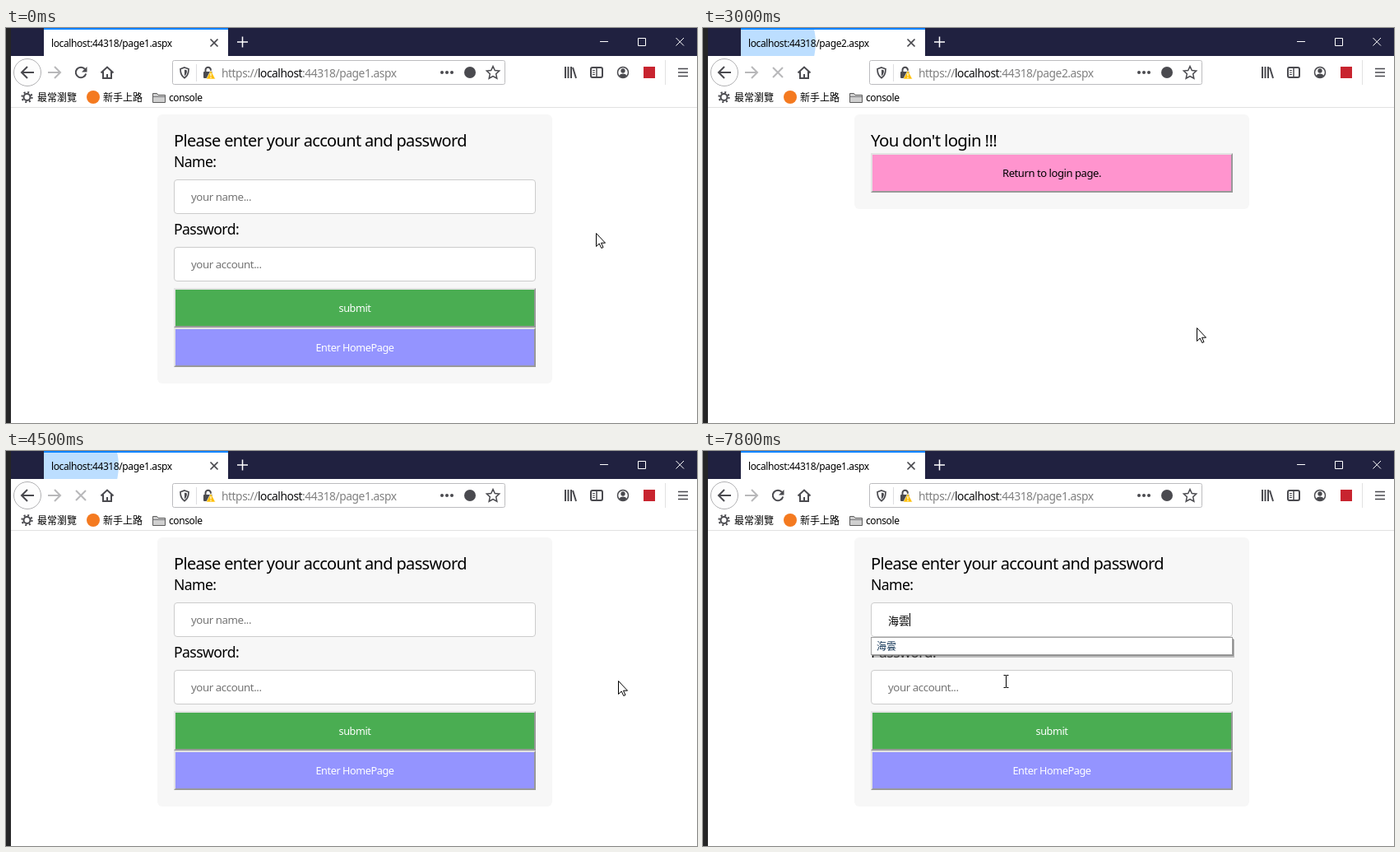
Write an HTML page that moves like this. It is 840 by 480 pixels and loops after 8000 ms.

```html
<!DOCTYPE html>
<html lang="en">
<head>
<meta charset="utf-8">
<title>Login page</title>
<style>
html, body { margin: 0; width: 100%; height: 100%; overflow: hidden; background: #fff; }
svg { display: block; }
text { font: 12px "Noto Sans", "Noto Sans CJK TC", "Noto Sans CJK", sans-serif; letter-spacing: -.033em; white-space: pre; }
.cjk { letter-spacing: 0; }
.h { font-size: 20px; }
.label { font-size: 17.6px; }
.hint { font-size: 13.3px; fill: #757575; }
.button { font-size: 12.7px; fill: #fff; text-anchor: middle; }
.url { font-size: 13.8px; fill: #808080; }
.icon { fill: none; stroke: #4a4a4f; stroke-width: 2; }
.thin { stroke-width: 1; }
.dim { stroke: #b8b8ba; }
.white { stroke: #fff; }
.solid { fill: #4a4a4f; }
.field { fill: #fff; stroke: #ccc; }
</style>
</head>
<body>
<svg width="840" height="480" viewBox="0 0 840 480">
  <defs>
    <clipPath id="tabClip"><path d="M46 2h224v32H46z"/></clipPath>
  </defs>
  <rect width="840" height="480" fill="#fff"/>
  <rect width="840" height="34" fill="#202140"/>
  <rect width="6" height="480" fill="#252526"/>

  <!-- Tab strip -->
  <rect x="46" width="224" height="34" fill="#fff"/>
  <rect x="46" width="224" height="2" fill="#0a84ff"/>
  <circle id="burst" cx="63" cy="18" fill="#0a84ff" clip-path="url(#tabClip)"/>
  <circle id="dot" cy="18" r="2" fill="#4a4a4f"/>
  <text id="tabTitle" y="23"></text>
  <path class="icon" d="M248.5 13.5l9 9m0-9l-9 9" style="stroke-width:1.7"/>
  <path class="icon white" d="M281 17h13m-6.5-6.5v13" style="stroke-width:1.5"/>
  <path class="icon thin white" d="M722 16.5h10M768.5 12.5h9v9h-9zM814.500 12l9.500 9.500m0-9.500l-9.500 9.500"/>

  <!-- Toolbar -->
  <path d="M6 96.500H840M801.500 39v30" stroke="#e1e1e2"/>
  <circle cx="26" cy="54" r="16.500" fill="#fdfdfd" stroke="#b1b1b3"/>
  <path class="icon" d="M34 54H19m7-7l-7 7 7 7"/>
  <path class="icon dim" d="M51 54h15m-7-7l7 7-7 7"/>
  <path id="arc" class="icon" d="M96 50a6.300 6.300 0 1 0 1.200 5.500"/>
  <path id="arcHead" class="solid" d="M98.500 47v6.500H92z"/>
  <path id="stop" class="icon dim" d="M85 48l12 12m0-12l-12 12"/>
  <path class="icon" d="M115.500 54.500l7.500-7 7.500 7M118 53v8h10v-8M123 61v-5"/>
  <rect x="202.500" y="39.500" width="404" height="29" rx="2" fill="#fff" stroke="#bcbcbf"/>
  <path class="icon" d="M217 48l5 1.800c0 5-1 8.500-5 11-4-2.500-5-6-5-11z" style="stroke-width:1.7"/>
  <path class="solid" d="M217 50.500v8c2-1.500 3-4 3-7z"/>
  <path d="M231.500 44v21" stroke="#dedee0"/>
  <path class="icon" d="M242.500 53v-2a3.200 3.200 0 0 1 6.400 0v2"/>
  <rect class="solid" x="240" y="53" width="11" height="8" rx="1"/>
  <path d="M249 51.500l5.500 10.500h-11z" fill="#ffbf00" stroke="#fff" stroke-width=".6"/>
  <path d="M249 55v3.500m0 1v1.500" stroke="#fff" stroke-width="1.200"/>
  <text class="url" x="262" y="60">https://<tspan fill="#0c0c0d">localhost</tspan>:44318/page<tspan id="urlPage"></tspan>.aspx</text>
  <g class="solid"><circle cx="530" cy="54" r="2"/><circle cx="536" cy="54" r="2"/><circle cx="542" cy="54" r="2"/></g>
  <circle class="solid" cx="564" cy="54" r="7"/>
  <path class="icon" d="M592 46.500l2.300 5 5.400.6-4 3.700 1.100 5.400-4.800-2.700-4.800 2.700 1.100-5.400-4-3.700 5.400-.6z" style="stroke-width:1.5"/>
  <path class="icon" d="M680 47v14m3.500-14v14m3.500-14v14m2-13l4 13"/>
  <rect class="icon" x="711" y="48" width="14" height="12" rx="2"/>
  <path class="icon" d="M718 48v12" style="stroke-width:1.500"/>
  <path class="icon thin" d="M713 51.500h3m-3 2.500h3m-3 2.500h3"/>
  <circle class="icon" cx="750" cy="54" r="6.500" style="stroke-width:1.500"/>
  <g class="solid"><circle cx="750" cy="52" r="2.700"/><path d="M745.500 57.500a5 3.500 0 0 1 9 0 5 5 0 0 1-9 0"/></g>
  <rect id="addon" x="775" y="47" width="14" height="14"/>
  <path class="icon" d="M817 49.500h12m-12 4.500h12m-12 4.500h12" style="stroke-width:1.600"/>

  <!-- Bookmarks -->
  <circle class="icon" cx="25.500" cy="84" r="4" style="stroke-width:2"/>
  <circle class="icon" cx="25.500" cy="84" r="6" style="stroke-width:2.200" stroke-dasharray="2 2.712"/>
  <text class="cjk" x="38" y="89">最常瀏覽</text>
  <circle cx="106" cy="84" r="8" fill="#f47a20"/>
  <text class="cjk" x="118" y="89">新手上路</text>
  <path d="M178.500 90.500v-11h5l1.500 2h8.500v9z" fill="#cfcfcf" stroke="#5c5c5c"/>
  <path d="M179 83.500h14" stroke="#77777a"/>
  <text x="198" y="89">console</text>

  <!-- Page -->
  <rect id="panel" x="184" y="105" width="480" rx="6" fill="#f7f7f7"/>
  <g id="loginPage">
    <text class="h" x="204" y="144">Please enter your account and password</text>
    <text class="label" x="204" y="169">Name:</text>
    <rect class="field" x="204.500" y="184.500" width="439" height="41" rx="3.500"/>
    <text id="nameHint" class="hint" x="225" y="210">your name...</text>
    <text id="typed" class="cjk" x="225" y="211" style="font-size:13px"></text>
    <path id="underline" stroke="#000" stroke-dasharray="1 1"/>
    <rect id="caret" y="197" width="1" height="16"/>
    <text class="label" x="204" y="251">Password:</text>
    <rect class="field" x="204.500" y="266.500" width="439" height="41" rx="3.500"/>
    <text class="hint" x="225" y="292">your account...</text>
    <g id="loginButtons"></g>
    <g id="popup">
      <rect x="207" y="229" width="439" height="22" fill="#777" opacity=".45"/>
      <rect x="206" y="228" width="439" height="21" fill="#777" opacity=".7"/>
      <rect x="204.500" y="226.500" width="439" height="21" fill="#fff" stroke="#a0a0a0"/>
      <text class="cjk" x="211" y="242" fill="#123456">海雲</text>
    </g>
  </g>
  <g id="deniedPage">
    <text class="h" x="204" y="144" style="font-size:20.500px">You don't login !!!</text>
    <g id="returnButton"></g>
  </g>

  <path id="arrow" d="M.5.5v16l3.700-3.500 2.600 5.500 2.200-1-2.500-5.300h5z" fill="#fff" stroke="#000"/>
  <path id="beam" d="M-3 -7.500h2.500l.5.500.5-.500H3M0-7V7M-3 7.500h2.500L0 7l.5.500H3" fill="none" stroke="#000"/>
</svg>
<script>
const LOOP = 8000, STEP = 100;
const $ = id => document.getElementById(id);
const show = (id, visible) => $(id).setAttribute('visibility', visible ? 'inherit' : 'hidden');
const set = (id, attrs) => {
  for (const name in attrs) $(id).setAttribute(name, attrs[name]);
};

// Outset button: light top and left edges, dark bottom and right edges.
const button = (y, fill, label, style = '') => `
  <path d="M204 ${y}h440l-2 2H206v44l-2 2z" fill="#e3e3e3"/>
  <path d="M644 ${y}v48H204l2-2h436V${y + 2}z" fill="#999"/>
  <rect x="206" y="${y + 2}" width="436" height="44" fill="${fill}"/>
  <text class="button" x="424" y="${y + 29}" style="${style}">${label}</text>`;
$('loginButtons').innerHTML = button(316, '#4aad52', 'submit') + button(364, '#9494ff', 'Enter HomePage');
$('returnButton').innerHTML = button(152, '#ff94ce', 'Return to login page.', 'fill:#000;font-size:13px');

const loads = [
  { start: 2700, swap: 2900, done: 3200 },
  { start: 4100, swap: 4400, done: 5000 },
];

// time, x, y
const pointer = [
  [400, 717, 249], [700, 725, 411], [800, 732, 373], [900, 732, 373],
  [1700, 573, 345], [2100, 573, 345], [2500, 546, 396], [2900, 546, 396],
  [3200, 756, 271], [3600, 756, 271], [3700, 717, 240], [3900, 579, 168],
  [4100, 579, 168], [4500, 744, 279], [4900, 419, 212], [5300, 401, 190],
  [7400, 401, 190], [7800, 368, 280],
];

const typing = [
  [5800, 'ㄏ'], [6000, 'ㄏㄞ'], [6200, '海'], [6400, '海ㄩ'], [6500, '海ㄩㄣ'], [6700, '海雲'],
];

function pointerAt(t) {
  const next = pointer.findIndex(key => key[0] > t);
  if (next === 0) return pointer[0].slice(1);
  if (next < 0) return pointer.at(-1).slice(1);
  const [t0, x0, y0] = pointer[next - 1], [t1, x1, y1] = pointer[next];
  const p = (t - t0) / (t1 - t0), ease = p * p * (3 - 2 * p);
  return [x0 + (x1 - x0) * ease, y0 + (y1 - y0) * ease].map(Math.round);
}

function drawBrowser(t) {
  const page = t >= loads[0].start && t < loads[1].start ? 2 : 1;
  const load = loads.find(l => t >= l.start && t < l.done);
  const loading = !!load && t < load.swap;
  const age = load ? t - load.start : 0;
  const stopping = !!load && age >= 200;

  $('urlPage').textContent = page;
  $('tabTitle').textContent = `localhost:44318/page${page}.aspx`;
  set('tabTitle', { x: loading ? 77 : 55 });
  set('dot', { cx: 63 - 4 * Math.cos((age - 100) / 200 * Math.PI) });
  show('dot', loading);
  show('arc', !stopping);
  show('arcHead', !load);
  show('stop', stopping);
  set('addon', { fill: loading ? '#d3dbe0' : '#c8242f' });

  const p = load ? (t - load.swap + 20) / 375 : 0;
  const bursting = p > 0 && p < 1;
  show('burst', bursting);
  if (bursting) set('burst', { r: 231 * p, opacity: .4 * (1 - p) });
}

function drawPage(t) {
  const denied = t >= loads[0].swap && t < loads[1].swap;
  show('loginPage', !denied);
  show('deniedPage', denied);
  set('panel', { height: denied ? 115 : 327 });

  const text = typing.findLast(key => key[0] <= t)?.[1] ?? '';
  const end = 225 + 13 * text.length;
  const caretOff = t < 5200 || (t >= 5700 && t < 5800) || (t >= 7300 && t < 7800);
  $('typed').textContent = text;
  show('nameHint', !text);
  set('caret', { x: end });
  set('underline', { d: `M226 212.5H${end}` });
  if (denied) return;
  show('caret', !caretOff);
  show('underline', text && t < 6900);
  show('popup', t >= 6900);
}

function drawPointer(t) {
  const [x, y] = pointerAt(t);
  const overField = x > 204 && x < 644 && ((y >= 184 && y < 226) || (y >= 266 && y < 308));
  const beam = overField && t >= loads[1].swap;
  show('arrow', !beam);
  show('beam', beam);
  set('arrow', { transform: `translate(${x} ${y})` });
  set('beam', { transform: `translate(${x + .5} ${y})` });
}

const begin = performance.now();
function frame() {
  const elapsed = (performance.now() - begin) % LOOP;
  const t = Math.floor(elapsed / STEP) * STEP;
  drawBrowser(t);
  drawPage(t);
  drawPointer(t);
  requestAnimationFrame(frame);
}
frame();
</script>
</body>
</html>
```
